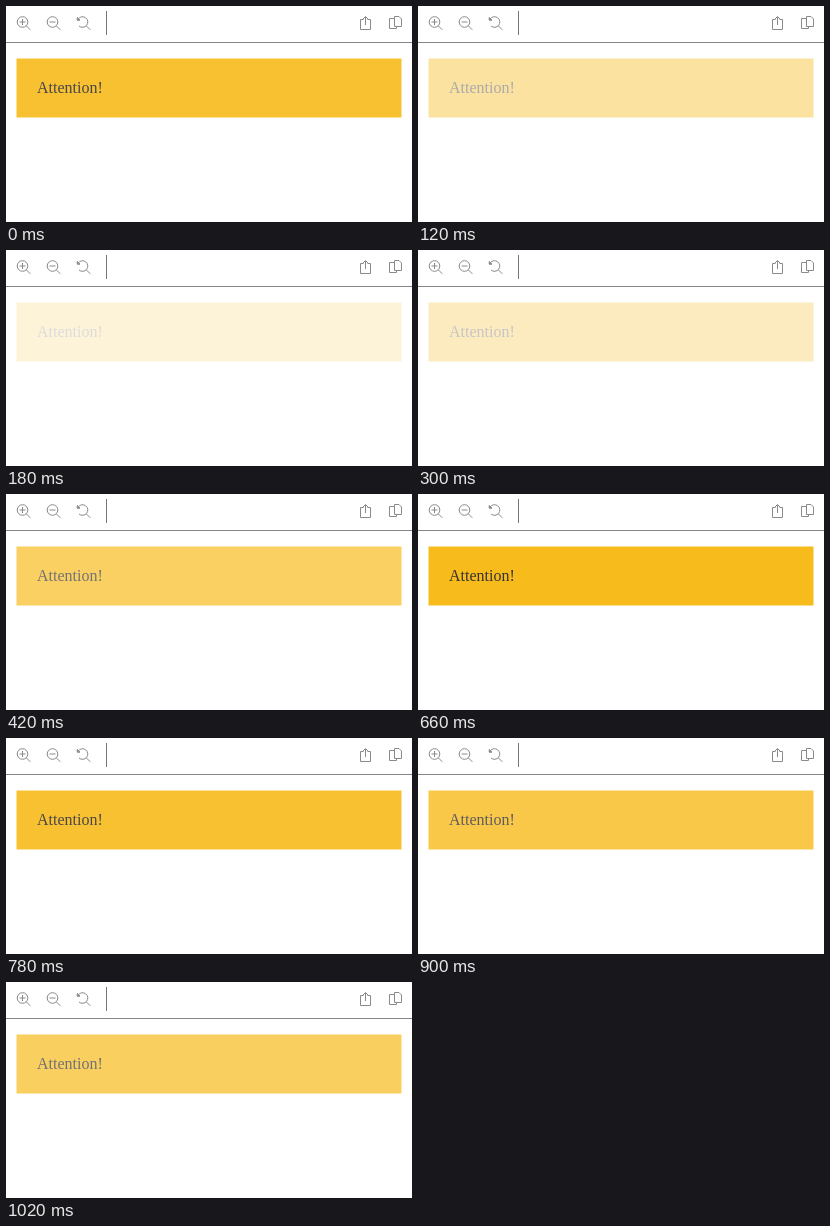
An HTML page for the animation above (1.08 s loop, 406x216 px).

```html
<!DOCTYPE html>
<html>
<head>
<meta charset="utf-8">
<style>
html, body { margin: 0; width: 100%; height: 100%; overflow: hidden; background: #fff; }
svg { display: block; width: 406px; height: 216px; }
.icon { fill: none; stroke: #8a8a8a; stroke-linejoin: round; }
text { font: 16px "Liberation Serif", "Times New Roman", serif; fill: #221e20; }
</style>
</head>
<body>
<svg viewBox="0 0 406 216">
  <defs>
    <g id="lens"><circle cx="16.5" cy="16" r="5.3"/><path d="M20.3 19.8L24.3 23.8"/></g>
  </defs>
  <g class="icon">
    <use href="#lens"/>
    <path d="M13.5 16h6M16.5 13v6"/>
    <use href="#lens" x="30"/>
    <path d="M43.5 16h6"/>
    <path d="M72 13.2A5.3 5.3 0 1 1 73 20M80.3 19.8L84.3 23.8"/>
    <path d="M71.2 11.5V14.2H74Z" fill="#8a8a8a"/>
    <path d="M357.5 13.5H354.5V23.5H364.5V13.5H361.5M359.5 19V10.8M357 13L359.5 10.5L362 13"/>
    <path d="M388.5 12.5H383.5V22.5H390.5V20.5M388.5 10.5H393L395.5 13V20.5H388.5Z"/>
  </g>
  <path d="M0 36.5H406" stroke="#858585"/>
  <path d="M100.5 5V29" stroke="#777"/>
  <g id="banner">
    <rect x="10.5" y="52.5" width="385" height="59" fill="#f7b404"/>
    <text x="31" y="87">Attention!</text>
  </g>
</svg>
<script>
const LOOP = 1080, STEP = 60;
// The banner fades out, flashes to full strength and slowly dims: [time, opacity]
const fade = [[0, 0.82], [220, 0], [540, 1], [1020, 0.63], [LOOP, 0.82]];
const banner = document.getElementById("banner");

function opacityAt(t) {
  const next = fade.findIndex(([time]) => time > t);
  const [t0, v0] = fade[next - 1], [t1, v1] = fade[next];
  return v0 + (v1 - v0) * (t - t0) / (t1 - t0);
}

const start = performance.now();
function draw(now) {
  const elapsed = Math.max(0, now - start) % LOOP;
  banner.setAttribute("opacity", opacityAt(Math.floor(elapsed / STEP) * STEP));
  requestAnimationFrame(draw);
}
draw(start);
</script>
</body>
</html>
```
